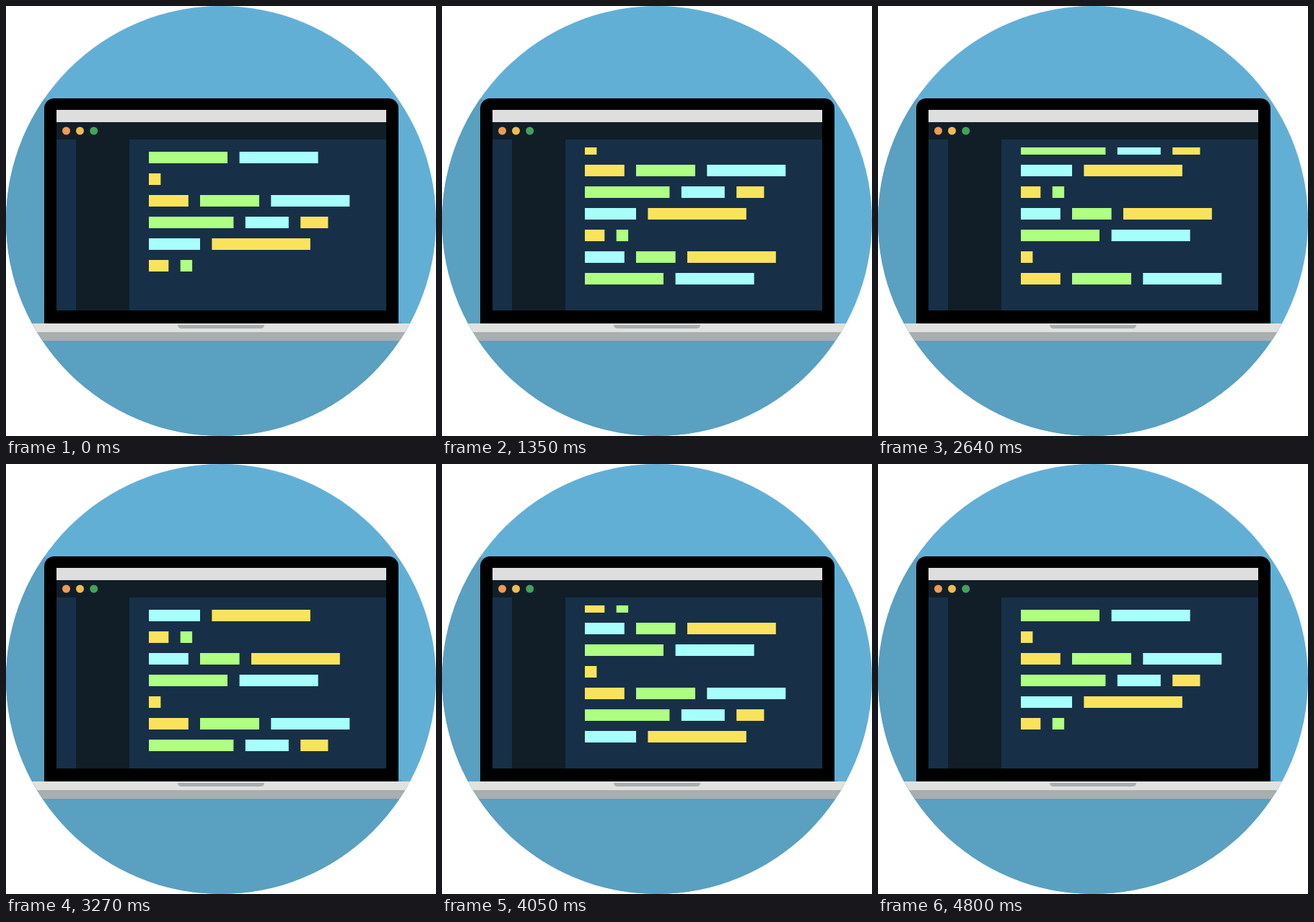
An HTML page without scripts that plays this animation: 596 px wide and 596 px high, repeating every 4830 ms.

```html
<!DOCTYPE html>
<html lang="en">
<head>
<meta charset="utf-8">
<title>Typing code on a laptop</title>
<style>
  html, body { margin: 0; width: 100%; height: 100%; overflow: hidden; background: #fff; }
  svg { display: block; width: 100vw; height: 100vh; }

  /* One loop is 161 ticks of 30 ms; the small lead keeps steps ahead of each tick. */
  svg { --loop: 4830ms; --tick: 30ms; --lead: 5ms; }

  .green  { fill: #aeff82; }
  .cyan   { fill: #a6fffb; }
  .yellow { fill: #fae35c; }

  .strip { animation: scroll var(--loop) steps(5, start) calc(0ms - var(--lead)) infinite; }
  .row   { animation: var(--wrap, none) var(--loop) step-end calc(0ms - var(--lead)) infinite; }

  /* --row: tick at which the line is emptied; --at: ticks until the bar starts */
  .row rect {
    --grow: grow-short;
    --begin: calc(var(--row) * var(--tick) - var(--loop) - var(--lead));
    height: 16px;
    transform-box: fill-box;
    transform-origin: left center;
    animation:
      var(--gate) var(--loop) step-end var(--begin) infinite,
      var(--grow) var(--loop) step-end calc(var(--begin) + var(--at) * var(--tick)) infinite;
  }
  .row .long { --grow: grow-long; }
  .at3  { --at: 3;  --gate: gate3; }
  .at8  { --at: 8;  --gate: gate8; }
  .at11 { --at: 11; --gate: gate11; }
  .at13 { --at: 13; --gate: gate13; }
  .at16 { --at: 16; --gate: gate16; }

  @keyframes gate3  { 0% { opacity: 0 } 1.8634%, 100% { opacity: 1 } }
  @keyframes gate8  { 0% { opacity: 0 } 4.9689%, 100% { opacity: 1 } }
  @keyframes gate11 { 0% { opacity: 0 } 6.8323%, 100% { opacity: 1 } }
  @keyframes gate13 { 0% { opacity: 0 } 8.0745%, 100% { opacity: 1 } }
  @keyframes gate16 { 0% { opacity: 0 } 9.9379%, 100% { opacity: 1 } }

  @keyframes grow-short {
    0% { transform: scaleX(.1); animation-timing-function: steps(2, end) }
    1.2422%, 100% { transform: scaleX(1) }
  }
  @keyframes grow-long {
    0% { transform: scaleX(.1); animation-timing-function: steps(5, end) }
    3.1056%, 100% { transform: scaleX(1) }
  }

  @keyframes scroll {
    0%, 12.4224% { transform: translateY(0) }
    15.5280%, 27.3292% { transform: translateY(-30px) }
    30.4348%, 37.8882% { transform: translateY(-60px) }
    40.9938%, 54.0373% { transform: translateY(-90px) }
    57.1429%, 70.1863% { transform: translateY(-120px) }
    73.2919%, 83.2298% { transform: translateY(-150px) }
    86.3354%, 96.8944% { transform: translateY(-180px) }
    100% { transform: translateY(-210px) }
  }

  /* A line that left at the top comes back at the bottom. */
  @keyframes wrap1 { 0% { transform: none } 14.9068%, 100% { transform: translateY(210px) } }
  @keyframes wrap2 { 0% { transform: none } 29.8137%, 100% { transform: translateY(210px) } }
  @keyframes wrap3 { 0% { transform: none } 40.3727%, 100% { transform: translateY(210px) } }
  @keyframes wrap4 { 0% { transform: none } 56.5217%, 100% { transform: translateY(210px) } }
  @keyframes wrap5 { 0% { transform: none } 72.6708%, 100% { transform: translateY(210px) } }
  @keyframes wrap6 { 0% { transform: none } 85.7143%, 100% { transform: translateY(210px) } }
</style>
</head>
<body>
<svg viewBox="0 0 596 596">
  <defs>
    <clipPath id="disc"><circle cx="298" cy="298" r="298"/></clipPath>
    <clipPath id="editor"><rect x="171" y="196" width="356" height="204"/></clipPath>
  </defs>

  <g clip-path="url(#disc)">
    <rect width="596" height="596" fill="#62afd6"/>
    <path d="M0 95L53 128L544 436L596 468V596H0Z" fill="#5aa0c0"/>
    <rect y="440" width="596" height="12" fill="#dfe2df"/>
    <rect y="452" width="596" height="12" fill="#a9aeaf"/>
  </g>

  <path d="M53 440V142a14 14 0 0 1 14-14H530a14 14 0 0 1 14 14V440Z"/>
  <path d="M238 442H358Q358 447 352 447H244Q238 447 238 442Z" fill="#a9aeaf"/>

  <rect x="70" y="144" width="457" height="278" fill="#173047"/>
  <rect x="70" y="144" width="457" height="17" fill="#dedede"/>
  <path d="M70 161H527V185H171V422H97V185H70Z" fill="#111e28"/>
  <circle cx="83.5" cy="173" r="5.5" fill="#f19a55"/>
  <circle cx="102.5" cy="173" r="5.5" fill="#efbc50"/>
  <circle cx="121.7" cy="173" r="5.5" fill="#41a35a"/>

  <g clip-path="url(#editor)">
    <g class="strip">
      <g class="row" style="--row:24; --wrap:wrap1">
        <rect class="green at3 long" x="198" y="202" width="109"/>
        <rect class="cyan at11 long" x="323.6" y="202" width="109"/>
      </g>
      <g class="row" style="--row:48; --wrap:wrap2">
        <rect class="yellow at3" x="198" y="232" width="16.4"/>
      </g>
      <g class="row" style="--row:65; --wrap:wrap3">
        <rect class="yellow at3" x="198" y="262" width="54.8"/>
        <rect class="green at8" x="269" y="262" width="82"/>
        <rect class="cyan at13 long" x="367.3" y="262" width="109"/>
      </g>
      <g class="row" style="--row:91; --wrap:wrap4">
        <rect class="green at3 long" x="198" y="292" width="117.4"/>
        <rect class="cyan at11" x="331.8" y="292" width="60"/>
        <rect class="yellow at16" x="408.2" y="292" width="38.2"/>
      </g>
      <g class="row" style="--row:117; --wrap:wrap5">
        <rect class="cyan at3" x="198" y="322" width="71"/>
        <rect class="yellow at8 long" x="285.4" y="322" width="136.4"/>
      </g>
      <g class="row" style="--row:138; --wrap:wrap6">
        <rect class="yellow at3" x="198" y="352" width="27.3"/>
        <rect class="green at8" x="241.7" y="352" width="16.4"/>
      </g>
      <g class="row" style="--row:-2">
        <rect class="cyan at3" x="198" y="382" width="54.8"/>
        <rect class="green at8" x="269" y="382" width="54.6"/>
        <rect class="yellow at13 long" x="340" y="382" width="122.8"/>
      </g>
    </g>
  </g>
</svg>
</body>
</html>
```
